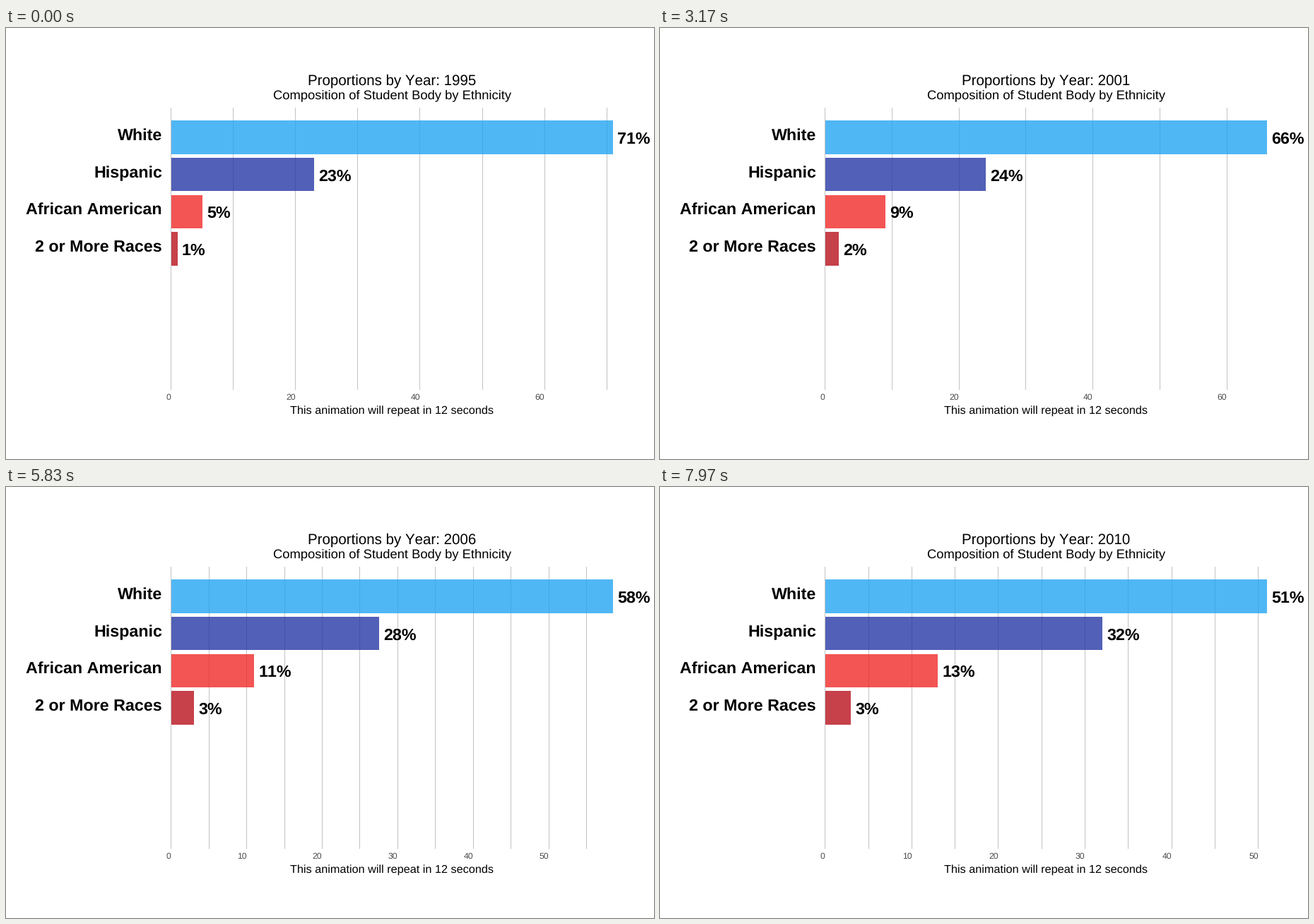
Animation, 917 px wide and 611 px high, one loop 8000 ms. Source, as a matplotlib script:

```python
import math

import matplotlib.pyplot as plt
from matplotlib.animation import FuncAnimation
from matplotlib.collections import LineCollection
from matplotlib.patches import Rectangle

W, H, DPI = 917, 611, 64
LEFT, RIGHT, TOP, BOTTOM = 233.7, 859.0, 113, 513
PITCH = (BOTTOM - TOP) / 7.6
FIRST_YEAR = 1995
FRAMES_PER_YEAR, MOVE_FRAMES, FRAMES = 16, 4, 240

# name, left edge of the name, bar colour, percentage per year
ROWS = [
    ("White", 158, "#24a5f3",
     [71, 70, 69, 69, 67, 67, 66, 64, 63, 62, 60, 58, 56, 54, 52, 51]),
    ("Hispanic", 124, "#2738a5",
     [23, 24, 24, 24, 24, 24, 24, 25, 25, 25, 26, 28, 29, 30, 31, 32]),
    ("African American", 28, "#f02a29",
     [5, 5, 5, 6, 8, 8, 9, 9, 10, 11, 11, 11, 12, 12, 13, 13]),
    ("2 or More Races", 41, "#b8121d",
     [1, 1, 1, 1, 1, 2, 2, 2, 2, 2, 3, 3, 3, 4, 4, 3]),
]

plt.rcParams.update({
    "font.family": "Liberation Sans",
    "text.hinting": "none",
    "text.kerning_factor": 6,
    "toolbar": "None",
})


def px(size):
    return size * 72 / DPI


fig = plt.figure(figsize=(W / DPI, H / DPI), dpi=DPI, facecolor="white")
ax = fig.add_axes([0, 0, 1, 1])
ax.set(xlim=(0, W), ylim=(H, 0))
ax.axis("off")


def write(x, baseline, text, size, **style):
    return ax.text(x, baseline, text, fontsize=px(size), va="baseline", **style)


title = write(427.3, 81, "", 20.5)
write(377.7, 100, "Composition of Student Body by Ethnicity", 18.4)
write(402, 547, "This animation will repeat in 12 seconds", 16.3)

grid = LineCollection([], colors="#c2c2c2", linewidths=px(1), zorder=1)
grid.set_snap(False)
ax.add_collection(grid, autolim=False)
ticks = [write(0, 527, "", 12.3, ha="right", color="#4d4d4d") for _ in range(8)]

bars, values = [], []
for row, (name, x, color, _) in enumerate(ROWS):
    middle = TOP + (0.8 + row) * PITCH
    top, bottom = round(middle - 0.45 * PITCH), round(middle + 0.45 * PITCH)
    bar = Rectangle((round(LEFT), top), 0, bottom - top,
                    fc=color, lw=0, alpha=0.8, zorder=2)
    bars.append(ax.add_patch(bar))
    write(x, round(middle + 4), name, 23.3, weight="bold")
    values.append(write(0, round(middle + 9), "", 23.3, weight="bold"))


def draw_axis(limit, scale):
    step = 20 if limit > 60.71 else 10
    lines = []
    for i in range(int(limit / (step / 2) + 1e-6) + 1):
        x = math.floor(LEFT + i * step / 2 * scale) + 0.5
        lines.append([(x, TOP), (x, BOTTOM)])
    grid.set_segments(lines)
    for i, tick in enumerate(ticks):
        visible = i * step <= limit + 1e-6
        tick.set_visible(visible)
        if visible:
            tick.set_text(str(i * step))
            tick.set_x(LEFT + i * step * scale)


def update(frame):
    year, phase = divmod(frame, FRAMES_PER_YEAR)
    t = max(0, phase - (FRAMES_PER_YEAR - MOVE_FRAMES) + 1) / MOVE_FRAMES
    nearest = year + (t >= 0.5)
    shares = [(1 - t) * data[year] + t * data[year + 1] for *_, data in ROWS]
    scale = (RIGHT - LEFT) / shares[0]

    title.set_text(f"Proportions by Year: {FIRST_YEAR + nearest}")
    draw_axis(shares[0], scale)
    for (*_, data), share, bar, value in zip(ROWS, shares, bars, values):
        end = LEFT + share * scale
        bar.set_width(round(end) - bar.get_x())
        value.set_x(end + 6.4)
        value.set_text(f"{data[nearest]}%")
    return [title, grid, *ticks, *bars, *values]


anim = FuncAnimation(fig, update, frames=FRAMES, interval=8000 / FRAMES,
                     init_func=lambda: update(0), repeat=True, repeat_delay=0)
plt.show()
```
